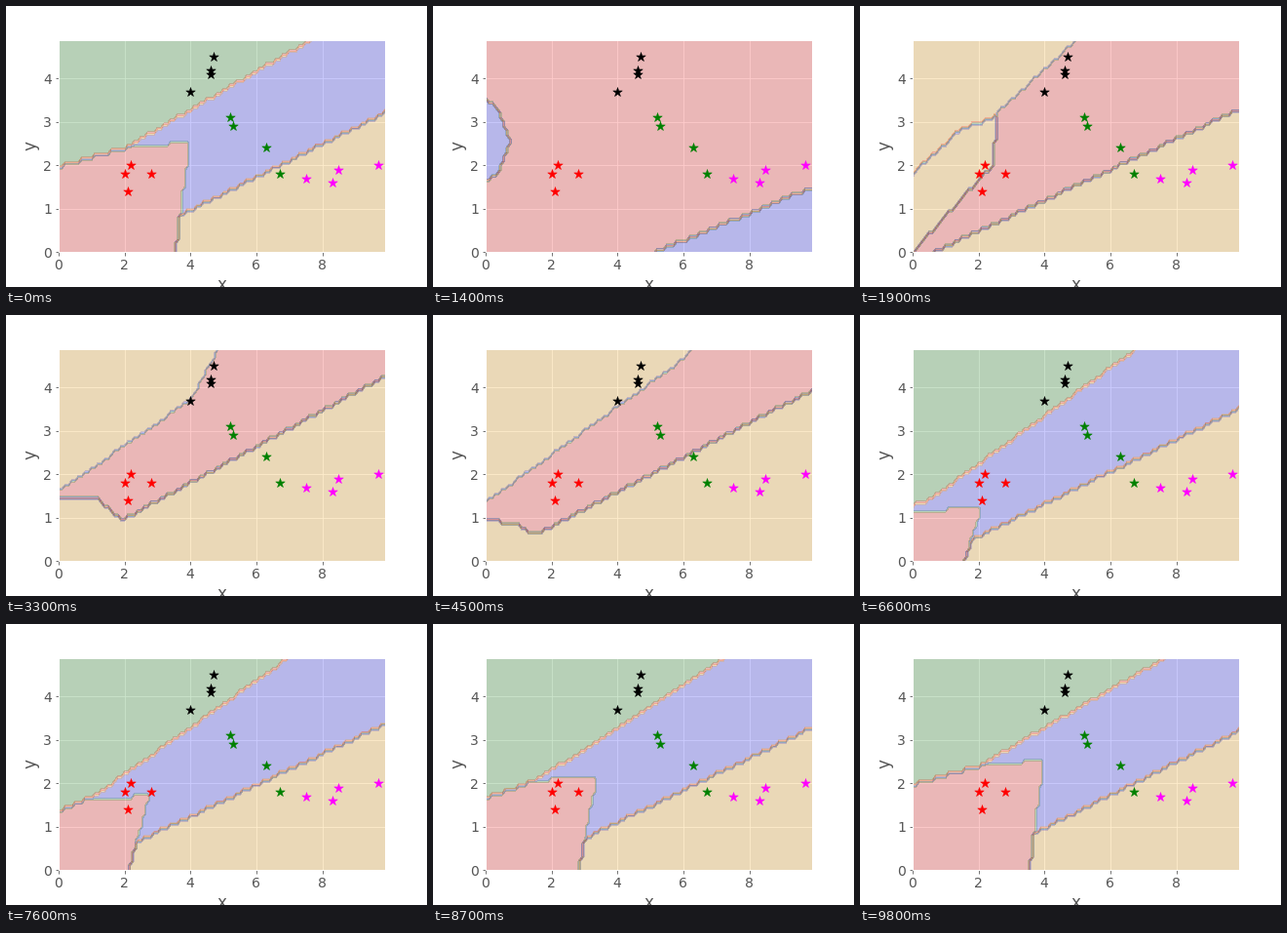
A matplotlib script for the animation above (9900 ms loop, 432x288 px).

```python
import numpy as np
import matplotlib.pyplot as plt
from matplotlib.animation import FuncAnimation

FRAMES, INTERVAL = 99, 100
COLORS = ["red", "green", "blue", "orange"]
FIRST_BORN = 45

plt.style.use("ggplot")
plt.rcParams.update({"font.family": "DejaVu Sans", "font.size": 14})

xs = np.arange(100) / 10
ys = np.arange(50) / 10
X, Y = np.meshgrid(xs, ys)

# Boundaries are made of straight lines (intercept, slope) that drift
# linearly between a few moments of the training.
UPPER = {
    14: [(-3, 0.2), (-3, 0.2)],
    19: [(1.415, 0.7), (1.415, 0.7)],
    33: [(1.6, 0.53), (-1.9, 1.4)],
    56: [(1.12, 0.572), (1.2, 0.3)],
    76: [(1.13, 0.54), (1.35, 0.32)],
    98: [(1.51, 0.443), (1.97, 0.21)],
}
LOWER = {
    1: [(-1.15, 0.46)],
    14: [(-1.62, 0.314)],
    19: [(-0.23, 0.355)],
    33: [(0.14, 0.416)],
    56: [(-0.145, 0.383)],
    76: [(-0.218, 0.361)],
    98: [(-0.57, 0.381)],
}
POCKET_TOP = {
    1: [(2.5, -0.6), (2.5, -1.9)],
    14: [(3.55, -0.6), (4.0, -1.9)],
    19: [(1.8, 0.7), (2.43, 0.27)],
    33: [(1.5, -0.04), (2.2, -0.66)],
    56: [(0.5, -0.3), (0.5, -0.3)],
}
POCKET_BASE = {
    1: [(2.7, 0.3), (2.7, 1.9)],
    14: [(1.66, 0.3), (1.1, 1.9)],
    19: [(-0.01, 0.83), (-17.5, 8)],
    33: [(-0.4, 0.4), (-0.4, 0.4)],
}


def lines_at(keys, t):
    """Heights over xs of all lines of a boundary at time t."""
    times = list(keys)
    poses = np.array(list(keys.values()), float)
    return [np.interp(t, times, poses[:, k, 0])
            + np.interp(t, times, poses[:, k, 1]) * xs
            for k in range(poses.shape[1])]


def first_class(n):
    """Corner region n steps after it appears."""
    right = 0.5 + 0.047 * n + 0.0002 * n**2 + (0.6 - 0.008 * n) * Y
    top = 0.0615 * n - 0.00033 * n**2 + 0.05 * X
    return (X < right) & (Y < top)


def classify(t):
    upper = np.max(lines_at(UPPER, t), axis=0)
    lower = lines_at(LOWER, t)[0]
    top = np.min(lines_at(POCKET_TOP, t), axis=0)
    base = np.max(lines_at(POCKET_BASE, t), axis=0)

    z = np.where(Y > upper, 3, 2)
    z[(Y < lower) | ((Y > base) & (Y < top))] = 4
    if t > FIRST_BORN:
        z[first_class(t - FIRST_BORN) & (Y <= upper)] = 1
    return z


def fill_levels(z):
    start, step, count = {
        1: (0.81, 0.4, 9),
        2: (2, 0.25, 9),
        3: (3, 0.15, 8),
    }[int(z.min())]
    return start + step * np.arange(count)


fig = plt.figure(figsize=(6, 4), dpi=72)
fig.subplots_adjust(left=0.125, right=0.9, bottom=0.125, top=0.88)
ax = fig.add_subplot()

STARS = {
    "red": ([2, 2.1, 2.2, 2.8], [1.8, 1.4, 2, 1.8]),
    "green": ([5.2, 5.3, 6.3, 6.7], [3.1, 2.9, 2.4, 1.8]),
    "black": ([4, 4.6, 4.6, 4.7], [3.7, 4.2, 4.1, 4.5]),
    "magenta": ([7.5, 8.3, 8.5, 9.7], [1.7, 1.6, 1.9, 2]),
}
for color, (px, py) in STARS.items():
    ax.scatter(px, py, s=100, marker="*", color=color, zorder=2)

ax.set_xlabel("x")
ax.set_ylabel("y")
ax.set_xticks(range(0, 9, 2))
ax.set_yticks(range(5))
ax.set_xlim(0, 9.9)
ax.set_ylim(0, 4.9)
ax.set_autoscale_on(False)

regions = None


def update(i):
    global regions
    if regions is not None:
        regions.remove()
    # the loop opens on its last state
    z = classify(i if i else FRAMES - 1)
    regions = ax.contourf(X, Y, z, levels=fill_levels(z),
                          colors=COLORS, alpha=0.2)
    return [regions]


anim = FuncAnimation(fig, update, frames=FRAMES, interval=INTERVAL,
                     init_func=lambda: [], repeat=True, repeat_delay=0)
plt.show()
```
